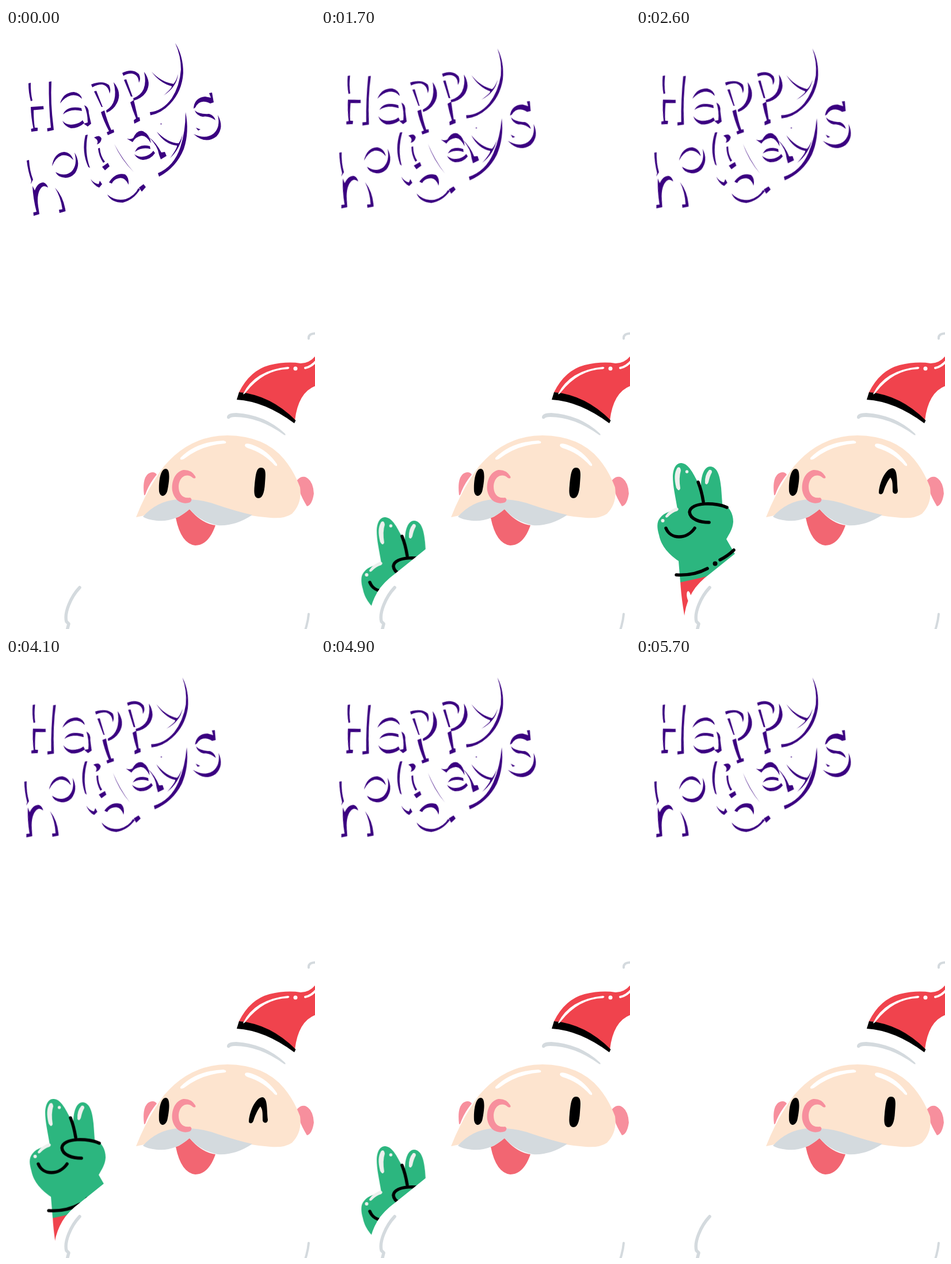
Recreate the animation shown at these times as an HTML page. Size 537 px wide and 1043 px high, loop 5800 ms.

```html
<!DOCTYPE html>
<html lang="en">
<head>
<meta charset="utf-8">
<title>Happy holidays</title>
<style>
html, body { margin: 0; width: 100%; height: 100%; overflow: hidden; background: #fff; }
svg { display: block; width: 100%; height: 100%; }

/* a small negative delay keeps the hard steps clear of rounding */
.greeting, .hand, .open, .wink, .sliver { animation: 5800ms step-end -5ms infinite; }

.greeting { fill: #3a0080; transform-origin: 190px 175px; animation-name: wobble; }
.hand { animation-name: wave; }
.open { animation-name: open; }
.wink { animation-name: wink; }
.sliver { animation-name: sliver; }

.line { fill: none; stroke-linecap: round; stroke-linejoin: round; }
.ink { stroke: #000; stroke-width: 5.5; }
.grey { stroke: #d4dade; }

@keyframes wobble {
  0%, 22.4138%, 32.7586% { transform: rotate(0deg); }
  17.2414%, 27.5862%, 37.931%, 100% { transform: rotate(5deg); }
}
@keyframes wave {
  0% { transform: translate(65.6px, 188px); }
  15.5172% { transform: translate(65.6px, 188px); animation-timing-function: steps(15, end); }
  41.3793% { transform: translate(4.1px, 11.75px); }
  44.8276% { transform: translate(0px, 0px); }
  70.6897% { transform: translate(4.1px, 11.75px); }
  72.4138% { transform: translate(4.1px, 11.75px); animation-timing-function: steps(15, end); }
  98.2759%, 100% { transform: translate(65.6px, 188px); }
}
@keyframes open {
  0%, 75.8621%, 100% { opacity: 1; }
  39.6552% { opacity: 0; }
}
@keyframes wink {
  0%, 75.8621%, 100% { opacity: 0; }
  39.6552% { opacity: 1; }
}
@keyframes sliver {
  0%, 41.3793%, 79.3103%, 100% { opacity: 0; }
  34.4828%, 72.4138% { opacity: .6; }
}
</style>
</head>
<body>
<svg viewBox="0 0 537 1043" preserveAspectRatio="none" role="img" aria-label="Happy holidays">

  <g class="greeting">
    <!-- H -->
    <path d="M39 96L43 95Q42.5 112 46 126L43 127Q39 112 39 96Z"/>
    <path d="M43 137L65 135.5L65.5 141L48 142.5Q48 160 50 173L55 173L55 178.5L44 180L43.5 175L47.5 174Q43.5 155 43 137Z"/>
    <path d="M74.5 93.5L79 92.5Q77 130 82.5 172L83 177L72 179.5L71.5 174L78 173Q74 135 74.5 93.5Z"/>
    <!-- a -->
    <path d="M94 131Q99 112 118 111Q130 113 132 123Q124 115 113 117Q102 120 94 131Z"/>
    <path d="M99 150Q106 134 131 139L132 144Q112 139 99 150Z"/>
    <path d="M98 161Q106 170 119 167Q129 165 133 160L136 165Q126 174 113 174Q102 171 98 161Z"/>
    <path d="M136 134Q144 137 144 148Q146 158 148 166L142 171L135 166L142 164Q142 148 136 134Z"/>
    <!-- p -->
    <path d="M148 98Q168 90 179 99Q183 107 180 114Q178 100 167 98Q158 98 150 103Z"/>
    <path d="M187 94Q202 112 193 130Q187 142 175 147L174 143Q196 130 187 94Z"/>
    <path d="M153 110L157 109L168 137L166 137Z"/>
    <path d="M165 146L171 143Q176 162 183 177L187 176L188 181L177 186L175 181L179 179Q169 160 165 146Z"/>
    <!-- p -->
    <path d="M202 78Q220 69 231 80Q235 88 231 95Q230 80 218 79Q210 79 204 83Z"/>
    <path d="M240 76Q254 95 243 112Q236 122 222 126L221 122Q248 112 240 76Z"/>
    <path d="M205 90L209 89L220 119L217 119Z"/>
    <path d="M216 129L222 125Q226 142 229 155L232 155L233 161L223 166L222 160L226 157Q220 143 216 129Z"/>
    <!-- y -->
    <path d="M294 26Q308 48 308 78Q306 110 285 132Q270 148 251 151.5L250 146Q272 144 288 122Q302 100 304 72Q304 48 294 26Z"/>
    <path d="M253 76Q270 94 291 97Q296 92 299 80Q297 102 274 117Q289 104 288 101Q268 96 253 76Z"/>
    <!-- h -->
    <path d="M36 230L40 229Q41 248 47 263L43 271L44 265Q38 248 36 230Z"/>
    <path d="M46 274L50 282Q55 268 65 268Q71 270 73 277Q65 271 60 279Q52 290 57 316L58 323L48 326L47.5 320L53 319Q47 296 46 274Z"/>
    <path d="M85 277Q99 292 103 314L103.5 318L93 321L92 315.5L98 314.5Q95 293 85 277Z"/>
    <!-- o -->
    <path d="M80 240Q83 217 101 215Q113 216 117 229Q108 219 97 221Q86 225 80 240Z"/>
    <path d="M119 216Q131 235 120 252Q108 265 92 257Q88 254 86 250Q102 259 114 249Q125 237 119 216Z"/>
    <!-- l -->
    <path d="M138 186L142 185Q136 216 146 243L143 241Q131 215 138 186Z"/>
    <path d="M147 262Q153 270 161 271L163 265L167 271L162 277Q152 273 147 262Z"/>
    <!-- i -->
    <path d="M153 190Q163 184 166 192Q165 200 158 202Q162 195 153 190Z"/>
    <path d="M160 209L163 208Q164 222 172 232L169 234Q161 222 160 209Z"/>
    <path d="M167 241L177 234L180 240L172 247Z"/>
    <!-- d -->
    <path d="M188 201Q202 228 222 250Q200 228 188 201Z"/>
    <path d="M179 268Q190 250 207 254Q214 259 213 272Q206 257 195 261Q187 263 184 270Z"/>
    <path d="M176 289Q190 301 208 297Q224 291 230 278L233 280Q222 298 203 303Q183 303 176 289Z"/>
    <path d="M231 277L239 271L243 276L236 284Z"/>
    <!-- a -->
    <path d="M210 192Q217 194 221 191Q228 176 238 179Q250 185 252 200Q244 186 235 187Q225 189 220 198Z"/>
    <path d="M224 215Q230 200 250 205L251 210Q236 206 224 215Z"/>
    <path d="M223 219Q232 226 244 222Q252 219 256 213L259 217Q252 228 238 229Q228 228 223 219Z"/>
    <path d="M248 189Q262 200 270 216L276 215L279 222L269 228L266 220Q264 205 248 189Z"/>
    <!-- y -->
    <path d="M312 146Q319 180 309 210Q296 242 266 258L264 252Q292 240 303 207Q312 180 312 146Z"/>
    <path d="M262 180Q282 200 300 200Q305 193 307 183Q304 208 285 226Q298 208 297 204Q276 202 262 180Z"/>
    <circle cx="269.5" cy="166.5" r="1"/>
    <!-- s -->
    <path d="M326 140Q327 121 346 119L356 121L353 113L358 112L361 129L355 131Q337 122 329 138Z"/>
    <path d="M328 143Q335 150 353 149Q362 152 364 160Q352 152 342 154Q331 152 328 143Z"/>
    <path d="M368 151Q380 172 366 188Q347 203 326 184Q347 194 361 183Q373 172 368 151Z"/>
    <path d="M330 173L338 176L334 178Z"/>
  </g>

  <g class="hand">
    <path fill="#f0434d" d="M77 960Q110 956 140 942L180 910L200 1040L92 1060Q79 1000 77 960Z"/>
    <ellipse cx="92" cy="987" rx="3.5" ry="10" transform="rotate(-10 92 987)" fill="#fff"/>
    <path fill="#2cb67f" d="M72 835C68 810 64 795 64 778C65 760 72 755 79 755C92 756 100 775 107 787L113 795C113 778 118 761 129 761C142 762 146 778 148 798L150 826C162 830 169 842 169 857C168 870 162 878 157 887L172 913L130 950Q105 956 77 962L74 925C58 914 44 900 40 880C36 866 36 857 42 850C50 840 62 838 72 835Z"/>
    <g class="line ink">
      <path d="M108 788Q114 803 117 822"/>
      <path d="M158 832C140 823 95 822 93 840C94 853 112 858 127 858"/>
      <path d="M52 868C60 888 88 888 102 868"/>
      <path d="M70 949Q100 951 124 938"/>
      <path d="M146 923Q160 916 170 906"/>
    </g>
    <circle cx="137.5" cy="929.5" r="4"/>
    <g fill="#eef0ee">
      <path d="M72 763Q64 775 70 798Q75 806 77 799Q74 780 78 768Q77 760 72 763Z"/>
      <path d="M127 767Q119 776 120 790Q123 795 126 788Q128 778 132 771Q132 766 127 767Z"/>
      <path d="M51 847Q58 836 71 832Q76 834 72 838Q62 841 55 849Q51 851 51 847Z"/>
      <circle cx="88.5" cy="770" r="2.7"/>
      <circle cx="46.5" cy="855" r="3"/>
    </g>
  </g>

  <!-- body hides the lowered hand -->
  <path fill="#fff" d="M230 870L186 901Q160 922 130 946Q108 962 98 979Q88 996 85 1014Q82 1030 82 1050H300V870Z"/>
  <path class="line sliver" stroke="#f78f9d" stroke-width="2" d="M103 1011Q100 1024 103 1036"/>
  <path class="line grey" stroke-width="5.5" d="M128 971C112 988 101 1015 105 1030L109 1034L106 1046"/>
  <path class="line grey" stroke-width="4" d="M526 1017Q525 1030 520 1045"/>

  <!-- hat -->
  <path class="line grey" stroke-width="4" d="M526 539Q525 530 539 530"/>
  <path fill="#f0434d" d="M405 632Q424 594 458 585Q488 578 512 582Q527 582 538 569V621Q508 632 502 681Q460 640 405 632Z"/>
  <path d="M405 632Q460 637 503.5 681L501 686Q450 648 401 645Z"/>
  <g fill="#fff">
    <path d="M412 635Q432 594 490 588Q495 589 490 592Q448 593 417 632Q413 637 412 635Z"/>
    <circle cx="503" cy="591" r="3.5"/>
  </g>
  <path class="line" stroke="#fff" stroke-width="4" d="M520 590Q531 588 540 577"/>
  <path fill="#d4dade" d="M384 675Q385 668 400 668Q450 671 485 704Q487 708 483 706Q440 675 398 675Q390 675 388 678Q384 679 384 675Z"/>

  <!-- face -->
  <g fill="#f78f9d">
    <path d="M240 811Q236 778 250 772Q258 769 262 775Q248 792 242 810Z"/>
    <path d="M503 789Q510 777 520 779Q534 785 535 808Q532 828 523 830Q514 815 511 806Z"/>
  </g>
  <path fill="#fde4cf" d="M226 849Q245 800 275 760Q320 707 385 707Q450 708 483 748Q500 768 511 797Q515 825 497 843Q484 852 460 850Q425 848 385 836L330 822Q270 818 240 846Q231 848 226 849Z"/>
  <path fill="#f26672" d="M295 850Q300 850 319 835Q340 860 364 863Q352 898 329 898Q304 895 295 850Z"/>
  <path fill="#d4dade" d="M238 848Q262 821 298 818Q335 816 362 826Q400 839 428 845Q398 865 368 863Q337 857 319 835Q293 858 262 855Q244 853 238 848Z"/>
  <path fill="#f78f9d" d="M329 778Q322 766 308 767C292 771 287 790 289 803C293 822 308 828 320 823Q325 818 320 815C306 817 300 808 300 795C301 778 315 771 325 781Q331 783 329 778Z"/>
  <g fill="#fff">
    <path d="M303 746Q330 718 378 716Q385 718 381 721Q340 724 309 748Q302 751 303 746Z"/>
    <path d="M416 722Q420 720 430 724Q455 733 471 757Q472 762 467 759Q447 737 420 729Q413 726 416 722Z"/>
  </g>

  <!-- eyes -->
  <path d="M277 765C286 764 284 785 281 800C279 814 268 816 266 804C265 788 268 766 277 765Z"/>
  <path class="open" d="M443 763C453 763 451 775 450 790C449 808 445 816 439 816C430 816 431 803 432 793C434 775 435 763 443 763Z"/>
  <path class="wink" d="M422 805C424 785 435 764 446 764C455 766 453 785 455 803C455 810 447 810 446 804C446 790 446 785 442 780C436 788 432 798 430 805C428 811 421 810 422 805Z"/>
</svg>
</body>
</html>
```
